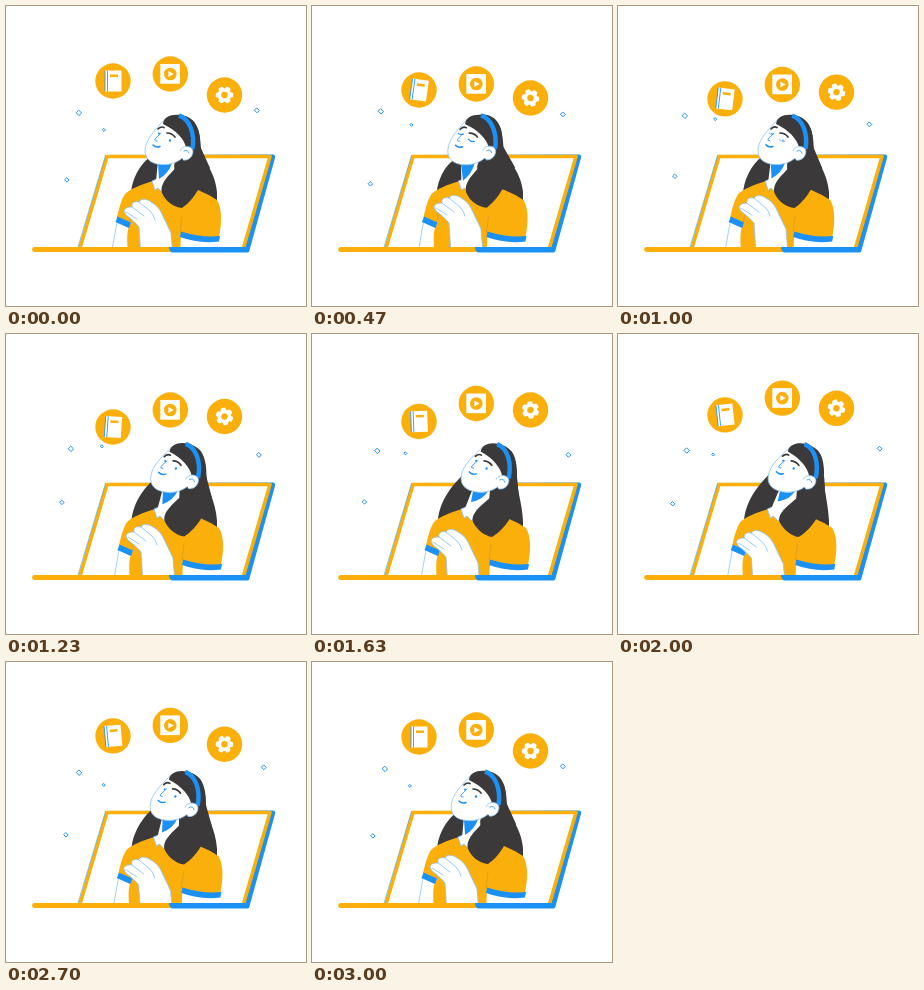
Recreate the animation shown at these times as an HTML page. Size 300 by 300 pixels, loop 3030 ms.

```html
<!DOCTYPE html>
<html lang="en">
<head>
<meta charset="utf-8">
<style>
  html, body { margin: 0; width: 100%; height: 100%; overflow: hidden; background: #fff; }
  svg { display: block; width: 100vw; height: 100vh; }
  .o { fill: #fbaf0b; }
  .b { fill: #1b90f5; }
  .w { fill: #fff; }
  .d { fill: #3b393a; }
  .skin { fill: #fff; stroke: #8cc3f3; stroke-width: .8; stroke-linejoin: round; }
  .line { fill: none; stroke: #1b90f5; stroke-width: 1; stroke-linecap: round; }
  .brow { fill: none; stroke: #3b393a; stroke-width: 1.7; stroke-linecap: round; }
  .fold { fill: none; stroke: #d39a2b; stroke-width: .7; }
</style>
</head>
<body>
<svg viewBox="0 0 300 300">
  <clipPath id="desk"><path d="M0 0H300V242H0Z"/></clipPath>

  <!-- laptop screen -->
  <path class="b" d="M101 148.500H266Q270 148 269 152L243 246H234L261 149Z"/>
  <path d="M74 242L101 150.500H264L237.500 242" fill="#fff" stroke="#fbaf0b" stroke-width="3.6" stroke-linejoin="round"/>
  <path class="line" d="M72 241L99.500 149.500" stroke-opacity=".65" style="stroke-width:.8"/>

  <g clip-path="url(#desk)">
    <path id="hairBack" class="d"/>
    <path id="lock" class="d"/>
    <g id="body">
      <path class="skin" d="M111 216L105 250H124V222Z"/>
      <path class="o" d="M147 175C134 179 124 183 119 188C115 194 113 203 111 211L125 217C120 224 121 234 122 250H174L175 227Q196 233 213 231C216 216 216 202 211 194Q202 188 192 184L163 177L156 186Z"/>
      <path class="b" d="M111.500 210.500L125 216.500L123 222L109.500 216Z"/>
      <path class="b" d="M175 225.500Q196 232 214 230L213 235.500Q193 238 174 231Z"/>
      <path class="fold" d="M127 205L124 216M174 226L176 210"/>
      <path class="skin" d="M146 175L151 173L163 176L157 187L152 182L149 184Z"/>
    </g>
    <path id="neck" class="w"/>
    <path id="shade" class="b"/>
    <path id="hairFront" class="d"/>
    <g id="head">
      <path class="skin" d="M159 113C153 120 143 129 140 139C137 150 142 156 151 158C161 160 170 157 175 153L186 147L178 122Z"/>
      <path class="d" d="M157 118C158 106 179 106 188 116C194 123 195 136 195 148L186 144L180 141C178 133 170 124 157 118Z"/>
      <path class="line" d="M173 109.500C184 113 189 128 186.500 143" style="stroke-width:4.500;stroke-linecap:butt"/>
      <path class="skin" d="M174 145C176 139 186 139 187 145C187 151 182 155 177 154"/>
      <path class="line" d="M178 145Q182 143 183 147" style="stroke-width:.8"/>
      <path class="brow" d="M152 123Q155 120 158 121.500M161 127Q166 127 169 131"/>
      <path class="line" d="M155 127L149 133Q148 135 151 135" style="stroke-width:.8"/>
      <path class="line" d="M147 139Q150 142 154 140.500" style="stroke-width:1.5"/>
      <g id="open" class="b"><circle cx="153" cy="127.500" r="1"/><circle cx="164" cy="134.500" r="1.200"/></g>
      <path id="shut" class="line" d="M150 127Q152 129 155 128M160 133Q162 136 166 135.500"/>
    </g>
    <g id="hands">
      <path class="skin" d="M118 205C119 201 124 201 126 201C125 196 129 195 133 196C135 192 141 193 145 196C151 199 153 203 155 206L165 227L167 252H135L133 221C130 217 124 212 120 209Z"/>
      <path class="line" d="M120 206L131 213M126 201L138 210M133 196L144 205Q148 209 149 214" style="stroke-width:.7" stroke-opacity=".65"/>
    </g>
  </g>

  <!-- laptop base -->
  <path class="o" d="M28 241H165V246H28Q24 243.500 28 241Z"/>
  <path class="b" d="M163 241H244L242 246.500H166Q163 245 163 241Z"/>

  <g id="bookIcon">
    <circle class="o" r="17.700"/>
    <g id="book">
      <path class="w" d="M-8-10.500H8.500V10.500H-8Z"/>
      <path class="line" d="M-8-10V10M-5.500-10V10" style="stroke-width:.8"/>
      <path class="o" d="M-3-6.500H5V-4H-3Z"/>
    </g>
  </g>
  <g id="playIcon">
    <circle class="o" r="17.700"/>
    <path class="w" d="M-10-10H9.700V9.700H-10Z"/>
    <circle class="o" r="6.300"/>
    <path class="w" d="M-2-3L3.300 0L-2 3Z"/>
  </g>
  <g id="gearIcon">
    <circle class="o" r="17.700"/>
    <g id="gear" class="w"></g>
  </g>
  <g id="bits"></g>
</svg>
<script>
const $ = id => document.getElementById(id);
const LOOP = 3030, SPAN = 3000;
const times = [0, 470, 770, 1230, 1630, 2370];
const N = times.length;

// Smooth periodic curve through one value per entry of `times`
function curve(v, t) {
  const at = i => times[(i + N) % N] + Math.floor(i / N) * SPAN;
  const val = i => v[(i + N) % N];
  const slope = i => (val(i + 1) - val(i - 1)) / (at(i + 1) - at(i - 1));
  let i = N - 1;
  while (times[i] > t) i--;
  const h = at(i + 1) - at(i), u = (t - at(i)) / h, r = 1 - u;
  return val(i) * r * r * (1 + 2 * u) + val(i + 1) * u * u * (3 - 2 * u)
    + h * u * r * (slope(i) * r - slope(i + 1) * u);
}

// Blend two path strings of the same structure
function blend([a, b], k) {
  const to = b.match(/-?[\d.]+/g);
  let i = 0;
  return a.replace(/-?[\d.]+/g, n => (+n + (to[i++] - n) * k).toFixed(2));
}

// Each shape upright and leaning back
const shapes = {
  hairBack: [
    "M172 109C190 109 195 125 194 140C196 154 209 164 211 186L211 198L170 198L168 156Z",
    "M182 111C200 112 205 128 205 144C205 157 210 168 211 187L211 200L174 200L178 156Z"],
  hairFront: [
    "M184 143C183 153 172 159 165 167C158 174 154 181 156 187C160 196 168 201 176 202C182 198 188 191 192 184L204 162L194 140Z",
    "M194 145C192 155 181 161 172 169C164 176 159 182 161 188C165 196 173 202 180 203C187 199 193 192 197 186L207 164L205 143Z"],
  lock: [
    "M146 150C138 154 127 168 125 186L152 186L160 156Z",
    "M152 140C141 150 128 166 126 185L154 186L167 156Z"],
  neck: [
    "M152 154L170 154L164 169L158 181L150 176Z",
    "M161 154L179 154L168 169L160 182L152 177Z"],
  shade: [
    "M152 157Q160 160 166 157Q163 167 153 173Z",
    "M161 157Q170 160 176 157Q171 166 159 168Z"]
};

const icons = {
  bookIcon: [107, [75, 84, 91, 93, 87.5, 75.5]],
  playIcon: [164.3, [68, 78, 80, 76, 69.5, 61]],
  gearIcon: [218.5, [89, 92, 89.5, 82.5, 76, 75.5]]
};

const bits = [
  [2.6, [73, 69, 69, 65, 65.5, 72], [107, 105.5, 105, 115, 117, 115]],
  [1.4, [98, 99.5, 98.5, 96, 93.5, 97.5], [124, 119, 115.5, 112.5, 119.5, 121]],
  [2.3, [251, 251, 250.5, 253, 256.5, 264.5], [104.5, 108.5, 115, 121, 121, 108.5]],
  [2.1, [61, 58.5, 57.5, 56, 52.5, 58], [174, 178, 173, 168.5, 168, 172]]
];

$("bits").innerHTML = bits.map(([r]) =>
  `<path class="line" d="M0 ${-r}L${r} 0L0 ${r}L${-r} 0Z"/>`).join("");

$("gear").innerHTML = [0, 60, 120].map(a =>
  `<rect x="-8.7" y="-2.6" width="17.4" height="5.2" rx="1.5" transform="rotate(${a})"/>`).join("")
  + '<circle r="6.8"/><circle class="o" r="3.2"/>';

const move = (id, x, y, more = "") =>
  $(id).setAttribute("transform", `translate(${x} ${y}) ${more}`);

function draw(now) {
  const t = Math.min(now % LOOP, SPAN) % SPAN;
  const key = (...v) => curve(v, t);

  const lean = key(0, -3, -3, 5, 9, 9);
  for (const id in shapes) $(id).setAttribute("d", blend(shapes[id], lean / 9));
  move("head", lean, 0, `rotate(${lean * .4} 165 160)`);
  move("body", key(0, .5, .5, 2, 3, 3), 0);
  move("hands", key(0, 4, 4, 2, 1, 0), key(0, -4, -4, -3, 2, 3));

  const closed = Math.max(0, Math.min(1, key(0, 1, 1, 0, 0, 0)));
  $("shut").style.opacity = closed;
  $("open").style.opacity = 1 - closed;

  for (const id in icons) move(id, icons[id][0], curve(icons[id][1], t));
  move("book", 0, 0, `rotate(${key(0, 8, 9, 4, -2, -8)})`);
  move("gear", 0, 0, `rotate(${key(0, 8, 6, 20, 25, 5)})`);
  bits.forEach(([, x, y], i) => $("bits").children[i]
    .setAttribute("transform", `translate(${curve(x, t)} ${curve(y, t)})`));
}

const start = performance.now();
(function tick() {
  draw(performance.now() - start);
  requestAnimationFrame(tick);
})();
</script>
</body>
</html>
```
